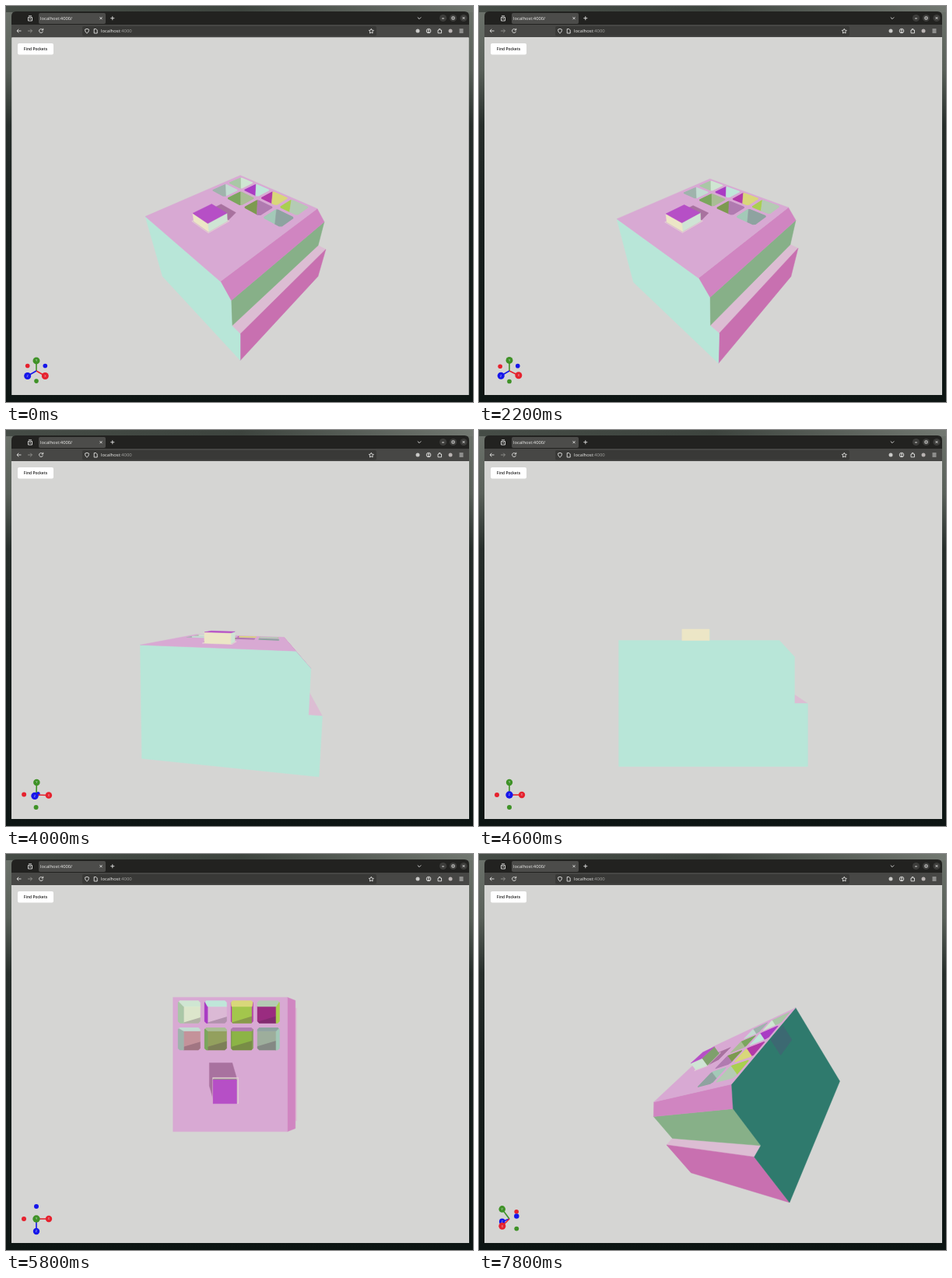
An HTML page with a canvas for the animation above (8000 ms loop, 600 by 509 pixels).

```html
<!DOCTYPE html>
<html lang="en">
<head>
<meta charset="utf-8">
<title>Part viewer</title>
<style>
html, body { margin: 0; width: 100%; height: 100%; overflow: hidden; background: #111816; }
svg, canvas { position: absolute; left: 0; top: 0; width: 600px; height: 509px; }
text { font-family: "Open Sans", "Noto Sans", sans-serif; }
</style>
</head>
<body>
<svg viewBox="0 0 600 509">
  <defs>
    <linearGradient id="side" x2="0" y2="1">
      <stop offset="0" stop-color="#6d736c"/><stop offset=".16" stop-color="#596059"/>
      <stop offset=".3" stop-color="#272e2b"/><stop offset=".5" stop-color="#1a211f"/>
      <stop offset="1" stop-color="#0d1513"/>
    </linearGradient>
    <linearGradient id="roof">
      <stop offset="0" stop-color="#454c46"/><stop offset=".5" stop-color="#3d443e"/>
      <stop offset="1" stop-color="#727871"/>
    </linearGradient>
  </defs>
  <path fill="url(#side)" d="M0 0H600V509H0z"/>
  <path fill="url(#roof)" d="M0 0H600V8H0z"/>
  <path fill="#222220" d="M7 24V13q0-6 6-6H589q6 0 6 6V24z"/>
  <path fill="#474745" d="M7 24H595V41H7z"/>
  <rect x="42" y="9" width="86" height="14" rx="2" fill="#4c4c4a"/>
  <rect x="98" y="26" width="378" height="12.5" rx="2" fill="#393937"/>
  <g fill="#3d3d3b"><circle cx="561.5" cy="15.5" r="4.6"/><circle cx="574.5" cy="15.5" r="4.6"/><circle cx="588" cy="15.5" r="4.6"/></g>
  <g fill="none" stroke="#e4e4e2" stroke-width=".9">
    <path d="M28.5 14.5h5v4.5h-5zM29 12.8h4M30 16.5h2"/>
    <path d="M120.5 14.2l3 3m0-3l-3 3M134.3 15.7h5m-2.500-2.500v5M528.8 14.500l2.200 2.200 2.200-2.200"/>
    <path d="M560 16h3M573 14h3v3h-3zM586.600 14.100l2.800 2.800m0-2.800l-2.800 2.800"/>
    <path d="M19.500 32h-5.500m2.300-2.300L14 32l2.300 2.300"/>
    <path stroke="#92928f" d="M28 32h5.500m-2.300-2.300l2.300 2.300-2.300 2.300"/>
    <path d="M47.300 30.800a2.500 2.500 0 1 0 .2 1.800M47.700 28.800v2.200h-2.200"/>
    <path d="M104 29.300l2.400.8c.1 2.300-.7 4-2.400 5-1.700-1-2.500-2.700-2.400-5z"/>
    <path d="M113.200 29.500h2.500l1.500 1.500v4h-4z"/>
    <path d="M469.300 29.200l.9 1.900 2.100.3-1.500 1.500.3 2.100-1.800-1-1.900 1 .4-2.100-1.600-1.500 2.200-.3z"/>
    <circle cx="543" cy="32" r="2.800"/><circle cx="543" cy="31.300" r=".8"/><path d="M541.500 34q1.500-1.500 3 0"/>
    <path d="M555 31h1.300v-1.500h1.700V31h1.500v3.800H555z"/>
    <path d="M582.500 30h5m-5 2h5m-5 2h5"/>
  </g>
  <circle cx="529" cy="32" r="2.500" fill="#c9c9c7"/>
  <circle cx="571" cy="32" r="2.500" fill="#b9b3b2"/>
  <text x="44" y="18" font-size="5.800" fill="#f2f2f0">localhost:4000/</text>
  <text x="122" y="34.200" font-size="5.900" fill="#f2f2f0">localhost<tspan fill="#a5a5a2">:4000</tspan></text>
</svg>
<canvas id="view"></canvas>
<svg viewBox="0 0 600 509">
  <rect x="15" y="48" width="46" height="14.500" rx="2" fill="#fff"/>
  <text x="38" y="57.200" font-size="5" font-weight="600" text-anchor="middle" fill="#222">Find Pockets</text>
</svg>
<script>
const canvas = document.getElementById('view'), ctx = canvas.getContext('2d');
const ratio = window.devicePixelRatio || 1;
canvas.width = 600 * ratio;
canvas.height = 509 * ratio;

const LOOP = 8000, STEP = 200;
const CX = 301, CY = 270.5, FOCAL = 299, DIST = 173.2, HALF = 50;
const rad = d => d * Math.PI / 180;

// Camera orientations as quaternions [w, x, y, z]
function orbit(azimuth, elevation) {
  const a = rad(azimuth) / 2, e = rad(elevation) / 2;
  return [Math.cos(a) * Math.cos(e), -Math.cos(a) * Math.sin(e),
          Math.sin(a) * Math.cos(e), Math.sin(a) * Math.sin(e)];
}
const snaps = [
  [3898, orbit(0, 0)],
  [4800, orbit(90, 0)],
  [5330, orbit(0, 90)],
  [7453, orbit(180, 0)]
];
function turn(from, to, angle) {
  const all = Math.acos(Math.min(1, from.reduce((s, v, i) => s + v * to[i], 0)));
  if (angle >= all) return to;
  const a = Math.sin(all - angle) / Math.sin(all), b = Math.sin(angle) / Math.sin(all);
  return from.map((v, i) => a * v + b * to[i]);
}
function cameraAt(t) {
  const k = Math.max(0, Math.min(1, (t - 1700) / 1250)), s = k * k * (3 - 2 * k);
  let q = orbit(45 - 7.7 * s, 35.26 - 8.6 * s);
  for (const [start, target] of snaps)
    if (t > start) q = turn(q, target, (t - start) * Math.PI / 1000);
  const [w, x, y, z] = q;
  return {
    right: [1 - 2 * (y * y + z * z), 2 * (x * y + w * z), 2 * (x * z - w * y)],
    up: [2 * (x * y - w * z), 1 - 2 * (x * x + z * z), 2 * (y * z + w * x)],
    near: [2 * (x * z + w * y), 2 * (y * z - w * x), 1 - 2 * (x * x + y * y)]
  };
}

let cam;
const dot = (a, b) => a[0] * b[0] + a[1] * b[1] + a[2] * b[2];
function project(p) {
  const s = FOCAL / (DIST - dot(p, cam.near));
  return [CX + dot(p, cam.right) * s, CY - dot(p, cam.up) * s];
}
function trace(pts) {
  ctx.beginPath();
  pts.forEach(p => ctx.lineTo(...p));
  ctx.closePath();
}
function paint(points, color, edge = color) {
  trace(points.map(project));
  ctx.fillStyle = color;
  ctx.fill();
  if (edge) {
    ctx.strokeStyle = edge;
    ctx.lineWidth = .5;
    ctx.stroke();
  }
}
// Paints a face only when the camera is on its outer side
function face(normal, points, color) {
  const eye = cam.near.map((v, i) => v * DIST - points[0][i]);
  if (dot(normal, eye) > .01) paint(points, color);
}
const flat = (x0, x1, z0, z1, y) => [[x0, y, z0], [x1, y, z0], [x1, y, z1], [x0, y, z1]];
const wallX = (x, z0, z1, y0, y1) => [[x, y0, z0], [x, y0, z1], [x, y1, z1], [x, y1, z0]];
const wallZ = (z, x0, x1, y0, y1) => [[x0, y0, z], [x1, y0, z], [x1, y1, z], [x0, y1, z]];

const profile = [[-50, 0], [35, 0], [43, -8.7], [43, -33.4], [50, -33.4], [50, -66.7], [-50, -66.7]];
const sideColors = ['#d8a9d3', '#d085c1', '#87b088', '#dcbdd3', '#c870b0', '#9a86a8', '#8fb8c4'];

function body() {
  for (const i of [3, 4, 2, 1, 6, 5]) side(i);
  for (const z of [HALF, -HALF])
    face([0, 0, z], profile.map(([x, y]) => [x, y, z]), z > 0 ? '#b8e6d8' : '#2f7a6d');
  side(0);
}
function side(i) {
  const [x0, y0] = profile[i], [x1, y1] = profile[(i + 1) % profile.length];
  face([y0 - y1, x1 - x0, 0],
    [[x0, y0, -HALF], [x1, y1, -HALF], [x1, y1, HALF], [x0, y0, HALF]], sideColors[i]);
}

// floor, x walls, z walls; back row first
const pockets = [
  ['#dce6cb', '#a9c7a6', '#cfe6d2'], ['#dbb9d5', '#a93cc4', '#bfe6d9'],
  ['#a3c64c', '#b23aa8', '#d9d77a'], ['#9a2c80', '#a9cf50', '#b4cbb4'],
  ['#c4929a', '#9fb3ac', '#c3dcd2'], ['#93a05e', '#7ba65e', '#a9bd94'],
  ['#8cb446', '#7d9a50', '#b07bb0'], ['#9dae9c', '#a3c9b8', '#8ea3a0']
];
const DEPTH = -18, SIZE = 16.800;

function pocket([floor, wx, wz], i) {
  const x0 = -46.500 + 19.700 * (i % 4), x1 = x0 + SIZE;
  const z0 = i < 4 ? -47.600 : -27.500, z1 = z0 + SIZE + .2, c = 1.5;
  ctx.save();
  trace([[x0 + c, z0], [x1 - c, z0], [x1, z0 + c], [x1, z1 - c], [x1 - c, z1], [x0 + c, z1], [x0, z1 - c], [x0, z0 + c]]
    .map(([x, z]) => project([x, 0, z])));
  ctx.clip();
  paint(flat(x0, x1, z0, z1, DEPTH), floor);
  paint([[x0, DEPTH, z1 - 4], [x1, DEPTH, z1 - 9], [x1, DEPTH, z1], [x0, DEPTH, z1]], 'rgba(70,40,70,.28)', null);
  face([1, 0, 0], wallX(x0, z0, z1, 0, DEPTH), wx);
  face([-1, 0, 0], wallX(x1, z0, z1, 0, DEPTH), wx);
  face([0, 0, 1], wallZ(z0, x0, x1, 0, DEPTH), wz);
  face([0, 0, -1], wallZ(z1, x0, x1, 0, DEPTH), wz);
  ctx.restore();
}

function boss() {
  const x0 = -19.500, x1 = -2.500, z0 = 10.800, z1 = 28, h = 7, dx = -3.500, dz = -12;
  if (cam.near[1] > .02) {
    paint([[x0, 0, z1], [x0 + dx, 0, z1 + dz], [x0 + dx, 0, z0 + dz], [x1 + dx, 0, z0 + dz], [x1, 0, z0], [x1, 0, z1]], '#a8729f');
    paint(flat(x0 - 1, x1 + 1, z0 - 1, z1 + 1, 0), '#d9bccb', '#eee2dc');
  }
  face([-1, 0, 0], wallX(x0, z0, z1, 0, h), '#b84a68');
  face([0, 0, -1], wallZ(z0, x0, x1, 0, h), '#7fa06c');
  face([1, 0, 0], wallX(x1, z0, z1, 0, h), '#cfe4d4');
  face([0, 0, 1], wallZ(z1, x0, x1, 0, h), '#ece6c6');
  face([0, 1, 0], flat(x0, x1, z0, z1, h), '#b64fc6');
}

// Pocket walls that shimmer through the outer faces
function seeThrough() {
  if (cam.near[0] > .95) {
    paint(wallX(29.500, -27.500, -9, -9.500, -16), '#76997f', null);
    paint(wallX(29.500, -47, -27.500, -9.500, -18), '#7c9f55', null);
    paint(wallX(29.500, -33, -23, 0, -9.500), '#c65cb6', null);
  }
  if (cam.near[2] < -.6)
    paint(wallZ(-47.600, -30, -11, -2, -14), 'rgba(80,80,120,.4)', null);
}

function gizmo() {
  const ox = 39, oy = 469, len = 16, heads = [];
  const colors = ['#e6222e', '#3f9227', '#1616ea'];
  colors.forEach((color, i) => {
    for (const s of [1, -1])
      heads.push({ color, label: s > 0 ? 'XYZ'[i] : '', depth: s * cam.near[i],
        x: ox + s * len * cam.right[i], y: oy - s * len * cam.up[i] });
  });
  heads.sort((a, b) => a.depth - b.depth);
  ctx.textAlign = 'center';
  ctx.textBaseline = 'middle';
  ctx.font = '4px "Open Sans", sans-serif';
  ctx.lineWidth = 1.600;
  for (const { color, label, depth, x, y } of heads) {
    ctx.strokeStyle = ctx.fillStyle = color;
    if (label) {
      ctx.beginPath();
      ctx.moveTo(ox, oy);
      ctx.lineTo(x, y);
      ctx.stroke();
    }
    ctx.beginPath();
    ctx.arc(x, y, label ? 4.200 + .5 * depth : 3 + .3 * depth, 0, 7);
    ctx.fill();
    if (label) {
      ctx.fillStyle = '#d8dce8';
      ctx.fillText(label, x, y + .2);
    }
  }
}

function draw(t) {
  cam = cameraAt(t);
  ctx.setTransform(ratio, 0, 0, ratio, 0, 0);
  ctx.fillStyle = '#d5d5d3';
  ctx.fillRect(7.500, 40.500, 587, 459.500);
  ctx.lineJoin = 'round';
  body();
  if (cam.near[1] > .02) pockets.forEach(pocket);
  seeThrough();
  boss();
  gizmo();
}
function frame(now) {
  draw(Math.floor(now % LOOP / STEP) * STEP);
  requestAnimationFrame(frame);
}
draw(0);
requestAnimationFrame(frame);
</script>
</body>
</html>
```
